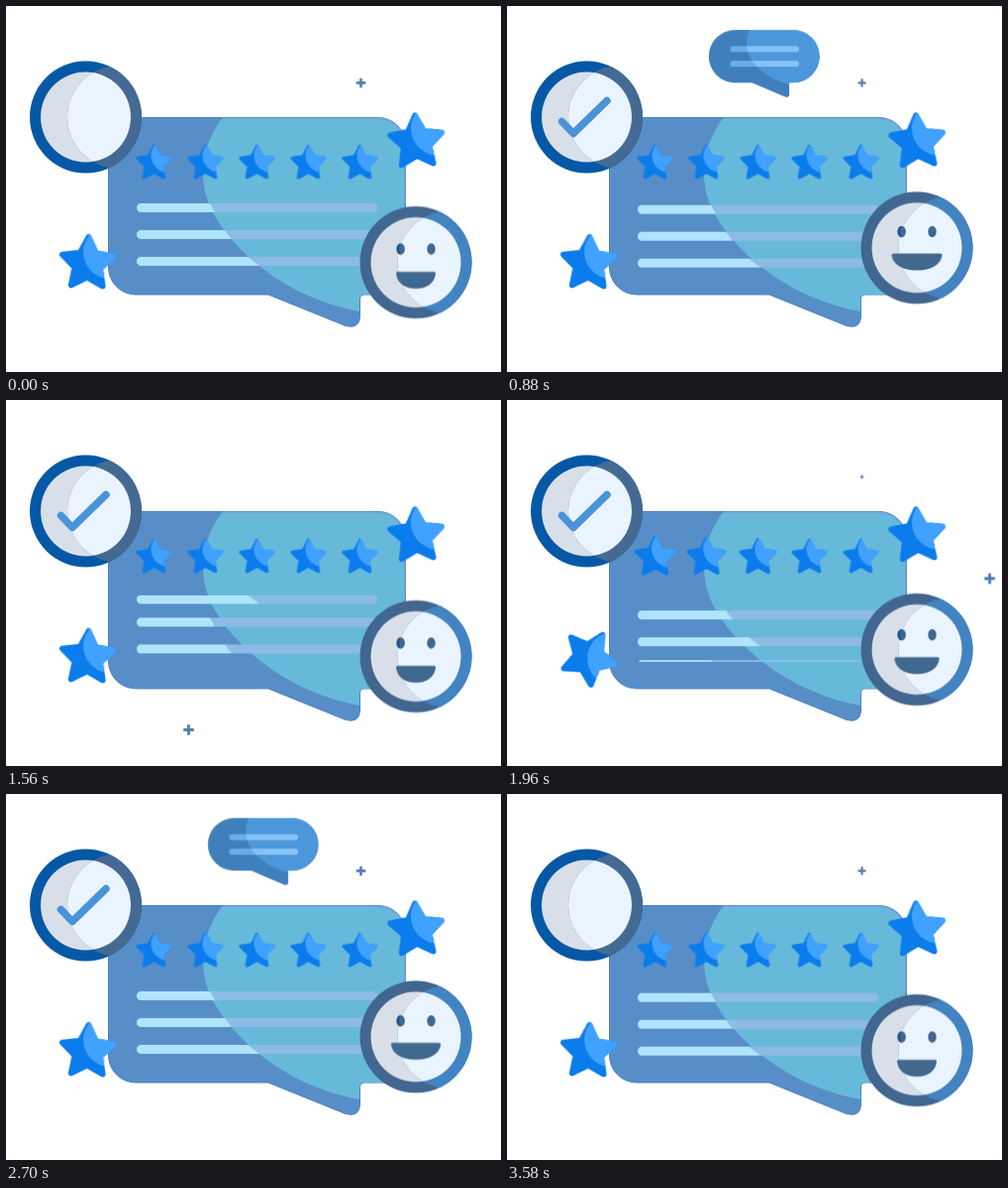
Animation, 500 px wide and 369 px high, one loop 3600 ms. Source, as an HTML page:

```html
<!DOCTYPE html>
<html lang="en">
<head>
<meta charset="utf-8">
<title>Reviews</title>
<style>
html, body { margin: 0; width: 100%; height: 100%; overflow: hidden; background: #fff; }
svg { display: block; width: 500px; height: 369px; }
.star { fill: #0b7ceb; stroke: #0b7ceb; }
.shine { fill: #41a1ff; stroke: #41a1ff; }

.spin { animation: spin 1800ms infinite; }
.half { animation-delay: -900ms; }
@keyframes spin {
  0% { transform: rotate(0deg); animation-timing-function: cubic-bezier(.65, 0, .35, 1); }
  33.9%, 100% { transform: rotate(360deg); }
}

.pulse { animation: pulse 900ms linear calc(40ms + 40ms * var(--i)) infinite; }
@keyframes pulse {
  0%, 35.56%, 100% { transform: scale(1); }
  17.78% { transform: scale(1.2); }
}

.scroll { animation: scroll 900ms linear infinite; }
@keyframes scroll { to { transform: translateY(-77px); } }

.twinkle { animation: twinkle 900ms var(--d) infinite; }
@keyframes twinkle {
  0% { transform: scale(0); animation-timing-function: cubic-bezier(.61, 1, .88, 1); }
  16.67% { transform: scale(1); animation-timing-function: cubic-bezier(.12, 0, .39, 0); }
  33.33%, 100% { transform: scale(0); }
}

.pop { animation: pop 1800ms linear infinite; }
@keyframes pop {
  0%, 17.78% { transform: scale(0); }
  28.89% { transform: scale(1.109); animation-timing-function: cubic-bezier(.22, .61, .36, 1); }
  68.89% { transform: scale(1); animation-timing-function: ease-out; }
  73.33% { transform: scale(1.109); }
  80.56%, 100% { transform: scale(0); }
}

.tick { stroke-dasharray: 1 2; animation: tick 1200ms ease-in-out infinite; }
@keyframes tick {
  0%, 8.33%, 90%, 100% { stroke-dashoffset: 1.1; }
  25%, 73.33% { stroke-dashoffset: 0; }
}

.face, .eyes, .mouth { animation: 1800ms cubic-bezier(.45, 0, .55, 1) infinite; }
.face { animation-name: lift; }
.eyes { animation-name: look; }
.mouth { animation-name: grin; }
@keyframes lift {
  0%, 2.2%, 62.2%, 100% { transform: translateY(0); }
  16.7%, 45.56% { transform: translateY(-16px); }
}
@keyframes look {
  0%, 2.2%, 62.2%, 100% { transform: translateY(0); }
  16.7%, 45.56% { transform: translateY(-3px); }
}
@keyframes grin {
  0%, 2.2%, 62.2%, 100% { transform: translateY(0) scaleX(1); }
  16.7%, 45.56% { transform: translateY(-4px) scaleX(1.3); }
}
</style>
</head>
<body>
<svg viewBox="0 0 500 369">
  <defs>
    <path id="shape" d="M0-17 5-6.9 16.2-5.3 8.1 2.6 10 13.8 0 8.5-10 13.8-8.1 2.6-16.2-5.3-5-6.9Z" stroke-width="3.6" stroke-linejoin="round"/>
    <clipPath id="glint"><circle cx="14" cy="-8" r="17"/></clipPath>
    <g id="star">
      <use href="#shape" class="star"/>
      <g clip-path="url(#glint)"><use href="#shape" class="shine"/></g>
    </g>
    <path id="plus" d="M-5.5 0H5.5M0-5.5V5.5" stroke="#4f7db4" stroke-width="3"/>
    <clipPath id="lit"><circle cx="33.5" r="52"/></clipPath>
    <clipPath id="page"><path d="M128 197H380V264H128Z"/></clipPath>
    <g id="rows">
      <path d="M136.5 203.5H371M136.5 230.5H371M136.5 257.5H371" stroke="#8dbbe6" stroke-width="9" stroke-linecap="round"/>
      <path d="M136.5 199H206L211 208H136.5a4.5 4.5 0 0 1 0-9M136.5 226H221L228 235H136.5a4.5 4.5 0 0 1 0-9M136.5 253H244L256 262H136.5a4.5 4.5 0 0 1 0-9" fill="#afe4fb"/>
    </g>
    <clipPath id="chat"><path id="chatShape" d="M231 25H289A26 26 0 0 1 289 77.5H285V89Q285 92.5 281 91.5L248 77.5H231A26 26 0 0 1 231 25Z"/></clipPath>
    <clipPath id="chatLit"><path d="M248 20C238 36 242 54 258 66Q270 76 286 79.500H330V20Z"/></clipPath>
    <path id="chatRows" d="M229 44H292M229 58.500H292" stroke-width="6" stroke-linecap="round"/>
  </defs>

  <!-- main bubble -->
  <path d="M131 112.500H376A27.500 27.500 0 0 1 403.500 140V291H362Q357.500 291 357.500 296V314Q356.500 326 343 322.500L265 291H131A27.500 27.500 0 0 1 103.500 263V140A27.500 27.500 0 0 1 131 112.500Z" fill="#578ec8" stroke="#4f83be"/>
  <path d="M217.500 114C192 150 196 186 211 212C238 258 295 297 357 308V296Q357 291 362 291H402.500V146Q402.500 114 374 114Z" fill="#67b9da"/>
  <path d="M218 113.200H376A26.800 26.800 0 0 1 402.800 140V200" fill="none" stroke="#74a5da" stroke-width="1.500"/>

  <g clip-path="url(#page)">
    <g class="scroll">
      <use href="#rows"/>
      <use href="#rows" y="77"/>
    </g>
  </g>

  <g transform="translate(149.500 158.800)"><g class="pulse" style="--i:0"><use href="#star"/></g></g>
  <g transform="translate(201.500 158.800)"><g class="pulse" style="--i:1"><use href="#star"/></g></g>
  <g transform="translate(253.500 158.800)"><g class="pulse" style="--i:2"><use href="#star"/></g></g>
  <g transform="translate(305.500 158.800)"><g class="pulse" style="--i:3"><use href="#star"/></g></g>
  <g transform="translate(357.500 158.800)"><g class="pulse" style="--i:4"><use href="#star"/></g></g>

  <g transform="translate(82.500 260) rotate(2) scale(1.600)"><g class="spin"><use href="#star"/></g></g>
  <g transform="translate(414.500 137.500) rotate(-3) scale(1.600)"><g class="spin half"><use href="#star"/></g></g>

  <!-- tick badge -->
  <g transform="translate(80.500 112)">
    <circle r="56.500" fill="#0558a5"/>
    <circle r="45.500" fill="#d8dfe8"/>
    <g clip-path="url(#lit)">
      <circle r="56.500" fill="#446a93"/>
      <circle r="45.500" fill="#eaf4fe"/>
    </g>
    <path class="tick" pathLength="1" d="M-25 4.500-13.500 16.500 20.500-16.500" fill="none" stroke="#4a93d8" stroke-width="7.500" stroke-linecap="round" stroke-linejoin="round"/>
  </g>

  <!-- smiley badge -->
  <g transform="translate(414 258.500)">
    <g class="face">
      <circle r="56.500" fill="#41668f"/>
      <circle r="45.500" fill="#d9dfe8"/>
      <g clip-path="url(#lit)">
        <circle r="56.500" fill="#4283c1"/>
        <circle r="45.500" fill="#eaf4fe"/>
      </g>
      <g class="eyes" fill="#41688f">
        <ellipse cx="-15.300" cy="-13.500" rx="4.200" ry="5.700"/>
        <ellipse cx="15.500" cy="-13.500" rx="4.200" ry="5.700"/>
        <path d="M-15.300-19.200A4.200 5.700 0 0 0-15.300-7.800Q-18-13-15.300-19.200Z" fill="#1f5590"/>
      </g>
      <path class="mouth" d="M-18.500 9.500H18.500Q20 9.500 20 11C19 21 11 26.500 0 26.500S-19 21-20 11Q-20 9.500-18.500 9.500Z" fill="#41688f"/>
    </g>
  </g>

  <!-- small bubble -->
  <g transform="translate(279 87)">
    <g class="pop">
      <g transform="translate(-279 -87)">
        <use href="#chatShape" fill="#3f80bc"/>
        <use href="#chatRows" stroke="#6aaee6"/>
        <g clip-path="url(#chat)">
          <g clip-path="url(#chatLit)">
            <use href="#chatShape" fill="#4c97da"/>
            <use href="#chatRows" stroke="#86c2f7"/>
          </g>
        </g>
      </g>
    </g>
  </g>

  <!-- sparkles -->
  <g transform="translate(358.500 77.500)"><g class="twinkle" style="--d:-100ms"><use href="#plus"/></g></g>
  <g transform="translate(487.500 180)"><g class="twinkle" style="--d:-870ms"><use href="#plus"/></g></g>
  <g transform="translate(65 187)"><g class="twinkle" style="--d:-665ms"><use href="#plus"/></g></g>
  <g transform="translate(184.500 332.500)"><g class="twinkle" style="--d:-360ms"><use href="#plus"/></g></g>
</svg>
</body>
</html>
```
